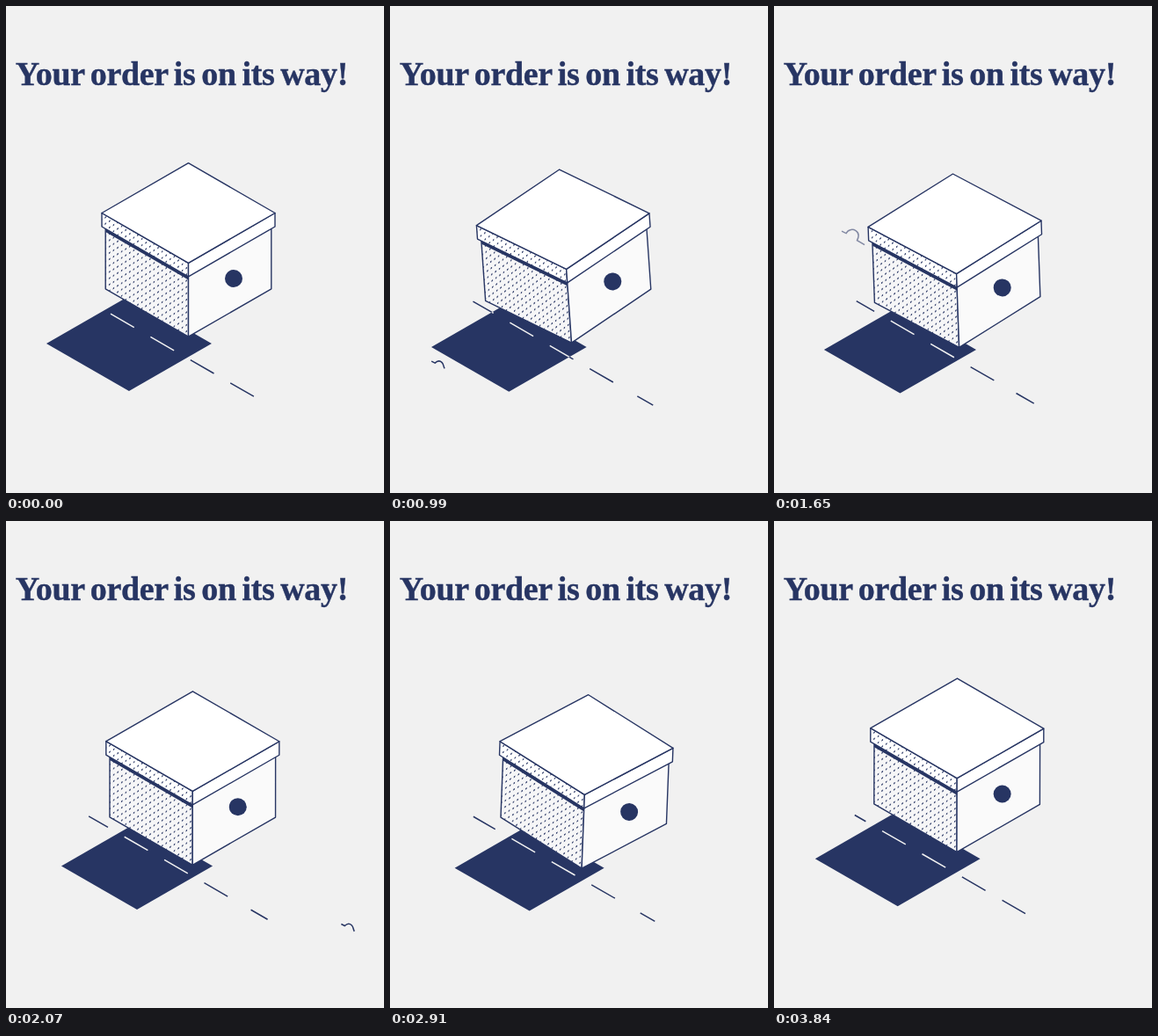
An HTML page that plays this animation: 430 px wide and 554 px high, repeating every 3870 ms.

```html
<!DOCTYPE html>
<html lang="en">
<head>
<meta charset="utf-8">
<title>Order on its way</title>
<style>
  html, body { margin: 0; width: 100%; height: 100%; overflow: hidden; background: #f1f1f1; }
  svg { display: block; width: 430px; height: 554px; }
  text {
    font: bold 38px "Liberation Serif", "Times New Roman", serif;
    letter-spacing: -.32px; word-spacing: -2.5px;
    fill: #273563; stroke: #273563; stroke-width: .4;
  }
  .line { fill: none; stroke: #273563; stroke-width: 1.5; }
  .light { stroke: #f1f1f1; }
  #box { stroke: #273563; stroke-width: 1.4; stroke-linejoin: round; }
</style>
</head>
<body>
<svg viewBox="0 0 430 554">
  <defs>
    <pattern id="dots" width="4.6" height="7.2" patternUnits="userSpaceOnUse" patternTransform="skewY(-32)">
      <circle cx="2.3" cy="3.6" r=".95" fill="#273563"/>
    </pattern>
    <clipPath id="shade"><path id="shadeShape"/></clipPath>
  </defs>
  <rect width="430" height="554" fill="#f1f1f1"/>
  <text x="10.8" y="90">Your order is on its way!</text>
  <path id="road" class="line"/>
  <path id="shadow" fill="#273563"/>
  <path id="roadLight" class="line light" clip-path="url(#shade)"/>
  <g id="gusts"></g>
  <g id="box"></g>
</svg>
<script>
const LOOP = 3870, STEP = 30;
const SLOPE = 0.577;
const NAVY = '#273563';
const el = id => document.getElementById(id);

function addPath(parent, attributes) {
  const node = document.createElementNS('http://www.w3.org/2000/svg', 'path');
  for (const name in attributes) node.setAttribute(name, attributes[name]);
  el(parent).append(node);
  return node;
}

const diamond = (x, y, w, h) => `M${x - w} ${y}l${w} ${-h}l${w} ${h}l${-w} ${h}Z`;

// A wall from the front edge (x = 0) out to a side corner
function wall(x, top, height, fill, stroke = NAVY) {
  const front = top + Math.abs(x) * SLOPE;
  addPath('box', { d: `M${x} ${top}L0 ${front}v${height}L${x} ${top + height}Z`, fill, stroke });
}

function buildBox() {
  const body = 94.3, lid = 98.5;
  wall(-body, 16, 70.3, '#f6f6f7');
  wall(-body, 16, 70.3, 'url(#dots)', 'none');
  wall(body, 16, 70.3, '#fafafa');
  wall(-body, 17.5, 4, NAVY, 'none');
  wall(-lid, 0, 15.5, '#fff');
  wall(-lid, 0, 15.5, 'url(#dots)', 'none');
  wall(lid, 0, 15.5, '#fff');
  addPath('box', { d: diamond(0, 0, lid, lid * SLOPE), fill: '#fff' });
  addPath('box', { d: 'M41.5 74.5a10 10 0 0 1 20 0a10 10 0 0 1-20 0Z', fill: NAVY, stroke: 'none' });
}

// Cyclic sway: a fundamental and its first overtone
function sway(t, mean, cos1, sin1, cos2, sin2) {
  const a = t / LOOP * 2 * Math.PI;
  return mean + cos1 * Math.cos(a) + sin1 * Math.sin(a)
    + cos2 * Math.cos(2 * a) + sin2 * Math.sin(2 * a);
}

function drawBox(t) {
  const x = sway(t, 209.4, -1.3, -13.5, -.6, -1.7);
  const y = sway(t, 245.5, -7, -6.1, -3, -.7);
  const angle = sway(t, -.6, .3, -3.1, .3, 0);
  el('box').setAttribute('transform', `translate(${x} ${y}) rotate(${angle})`);

  // The shadow follows the box and shrinks as it drops and tilts
  const drop = y - 235.5;
  const scale = 1 - .0056 * drop + .005 * angle;
  const shadowX = 141 + .85 * (x - 208.75) + .33 * drop - .55 * angle;
  const shape = diamond(shadowX, 384 + .56 * drop, 94 * scale, 54 * scale);
  el('shadow').setAttribute('d', shape);
  el('shadeShape').setAttribute('d', shape);
}

function drawRoad(t) {
  const gap = 45.4, length = 26.7, period = 214.4;
  const phase = 1 - (t / period) % 1;
  const roadY = x => 350.2 + (x - 119) * SLOPE;
  let d = '';
  for (let i = -1; i < 4; i++) {
    let start = 119 + gap * (phase + i);
    const end = start + length;
    start = Math.max(start, 91 + 9 * phase);
    if (i === 3) start += length * Math.max(0, phase - .08) / .92;
    d += `M${start} ${roadY(start)}L${end} ${roadY(end)}`;
  }
  el('road').setAttribute('d', d);
  el('roadLight').setAttribute('d', d);
}

const LONG = 'M0 0l5 2.5c2-4 7-5.5 11-3 4 2.5 3.5 7 1.5 11l8.5 5';
const SHORT = 'M0 0l4 2c3-3 6-2.5 8-.5 2 2 1.5 4.5 3 6.8';
const GUST_LIFE = 1700, GUST_SPEED = .2085;
const gusts = [
  { shape: LONG, born: 55, x: 409.6, y: 448 },
  { shape: SHORT, born: 10, x: 251.5, y: 522 },
  { shape: SHORT, born: 1970, x: 402.2, y: 470.5 }
].map(gust => ({ ...gust, node: addPath('gusts', { d: gust.shape, class: 'line' }) }));

function drawGust({ node, born, x, y }, t) {
  const age = t - born, shift = -age * GUST_SPEED;
  const alpha = Math.max(0, Math.min(1, age / 60, (GUST_LIFE - age) / 190));
  node.setAttribute('transform', `translate(${x + shift} ${y + shift * SLOPE})`);
  node.setAttribute('opacity', alpha);
}

function draw(t) {
  drawBox(t);
  drawRoad(t);
  gusts.forEach(gust => drawGust(gust, t));
}

buildBox();
const began = performance.now();
function tick() {
  const t = (performance.now() - began) % LOOP;
  draw(Math.floor(t / STEP) * STEP);
  requestAnimationFrame(tick);
}
tick();
</script>
</body>
</html>
```
